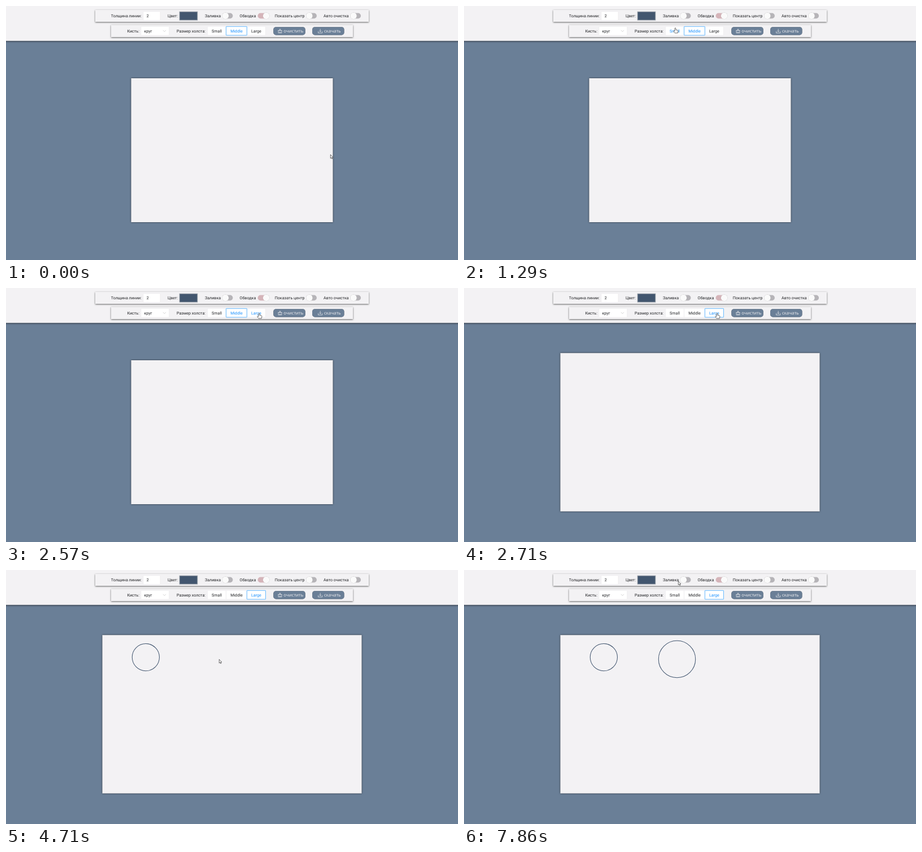
Write an HTML page that moves like this. It is 800x450 px and loops after 8000 ms.

```html
<!DOCTYPE html>
<html lang="ru">
<meta charset="utf-8">
<title>Paint</title>
<style>
  html, body { margin: 0; width: 100%; height: 100%; overflow: hidden; background: #6a7f97; }
  svg { display: block; width: 800px; height: 450px; }
  text { font: 7.14px Roboto, sans-serif; fill: #222326; text-rendering: geometricPrecision; }
  .btn text { font: 7.9px "Open Sans", "Noto Sans", sans-serif; fill: #f3f2f4; }
  .panel { fill: #f3f2f4; filter: drop-shadow(0 1px 1.4px #0009); }
  #sheet { filter: drop-shadow(.7px .8px 1.6px #000a); }
  .field { fill: #fff; stroke: #e4e3e7; stroke-width: .5; }
  .active rect { stroke: #40a9ff; stroke-width: .8; }
  .active text, .hover text { fill: #1890ff; }
  .line { fill: none; stroke: #f3f2f4; stroke-width: .7; }
  .ring { fill: none; stroke: #42566f; stroke-width: 1.02; }
  .btn rect { fill: #6a7f97; filter: drop-shadow(0 .4px .7px #0009); }
  .knob { fill: #fafafa; filter: drop-shadow(0 .6px .7px #0006); }
  .cursor { fill: #fff; stroke: #333; stroke-width: .7; }
</style>
<svg viewBox="0 0 800 450">
  <rect class="panel" x="-9" y="-9" width="818" height="70.8"/>
  <rect class="panel" x="158" y="7" width="484" height="21"/>
  <rect class="panel" x="186" y="33.5" width="428" height="21.5"/>

  <text x="185.8" y="19.7">Толщина линии:</text>
  <rect class="field" x="242.8" y="9.8" width="30.2" height="15.8" rx="1"/>
  <text x="248.7" y="20.2">2</text>
  <text x="286" y="19.7">Цвет:</text>
  <rect x="307.2" y="10.2" width="31.6" height="14.8" fill="#42566f" stroke="#8e969f"/>
  <g id="switches"></g>

  <text x="214.5" y="46.5">Кисть:</text>
  <rect class="field" x="238.8" y="36.2" width="50" height="15.8" rx="1"/>
  <text x="244.4" y="46.7">круг</text>
  <path d="M278 42.8l2.5 2.8 2.5-2.8" fill="none" stroke="#bbb" stroke-width=".6"/>
  <text x="302" y="46.5">Размер холста:</text>
  <g id="sizes"></g>

  <g class="btn">
    <rect x="473.3" y="37.2" width="56.4" height="14.2" rx="4.5"/>
    <path class="line" d="M481.3 43.5h7.4M482 43.5v4.2h6v-4.2M484 43.5v-2.3h2v2.3M484 47.5v-1.8M486 47.5v-1.8"/>
    <text x="491.2" y="47.3">очистить</text>
    <rect x="542.1" y="37.2" width="56.4" height="14.2" rx="4.5"/>
    <path class="line" d="M552.6 44.8v3h7.2v-3M556.2 40.6v5M554.4 43.8l1.8 1.9 1.8-1.9"/>
    <text x="563" y="47.3">скачать</text>
  </g>

  <rect class="panel" id="sheet"/>
  <g id="rings"></g>
  <path class="cursor" id="arrow" d="M.3 .3V7L1.8 5.6 2.9 7.8 3.8 7.4 2.9 5.2H4.8Z"/>
  <path class="cursor" id="hand" d="M-1 6V1Q0-.8 1 1V3.8L4.2 4.5Q5 4.8 4.9 6L4.2 9.4H-.8L-3.4 6.4Q-3.2 5-1 6Z"/>
</svg>
<script>
const $ = s => document.querySelector(s);

function add(parent, tag, attrs, text = '') {
  const el = document.createElementNS('http://www.w3.org/2000/svg', tag);
  for (const k in attrs) el.setAttribute(k, attrs[k]);
  el.textContent = text;
  return parent.appendChild(el);
}

// switches flow from left to right after their labels
let x = 352;
for (const label of ['Заливка', 'Обводка', 'Показать центр', 'Авто очистка']) {
  const on = label === 'Обводка';
  const text = add($('#switches'), 'text', { x, y: 19.7 }, label);
  x += text.getComputedTextLength() + 8.3;
  add($('#switches'), 'rect', {
    x: x - 5, y: 12.6, width: 18, height: 9.6, rx: 4.8, fill: on ? '#d5b4b9' : '#b6b4b8'
  });
  add($('#switches'), 'circle', { class: 'knob', cx: x + on * 10, cy: 17.4, r: 5.8 });
  x += 25.1;
}

// sheet sizes in page pixels; buttons are as wide as their labels
const scale = .51, pad = 7.65;
x = 356.4;
const sizes = [['Small', 600, 400], ['Middle', 700, 500], ['Large', 900, 550]].map(([label, w, h]) => {
  const el = add($('#sizes'), 'g');
  const box = add(el, 'rect', { class: 'field', x, y: 36.3, height: 15.6, rx: .5 });
  const text = add(el, 'text', { x: x + pad, y: 46.7 }, label);
  const left = x, width = text.getComputedTextLength() + 2 * pad;
  box.setAttribute('width', width);
  x += width;
  return { el, left, right: x, w: w * scale, h: h * scale };
});

// circles grow while the pointer drags from step `from` to step `to`
const rings = [
  { cx: 247.4, cy: 154.6, r: 24.1, from: 26, to: 29 },
  { cx: 377, cy: 158, r: 32.7, from: 33, to: 38 }
];
for (const ring of rings) ring.el = add($('#rings'), 'circle', { class: 'ring', cx: ring.cx, cy: ring.cy });

// pointer moves: first step, last step, goal
const moves = [
  [0, 8, 374, 38.5], [10, 14, 411, 47], [15, 18, 448, 44.5], [20, 25, 235, 151],
  [25, 26, 247.4, 154.6], [26, 29, 250, 178.5], [29, 33, 377, 158], [33, 38, 404, 177],
  [40, 41, 357, 158], [42, 44, 384, 141], [47, 55, 379, 19.5]
];
const clicks = [10, 15, 19];

const ramp = (t, a, b) => Math.min(1, Math.max(0, (t - a) / (b - a)));
const ease = k => k * k * (3 - 2 * k);

function pointer(step) {
  let px = 574, py = 263;
  for (const [from, to, goalX, goalY] of moves) {
    const k = ease(ramp(step, from, to));
    px += (goalX - px) * k;
    py += (goalY - py) * k;
  }
  return [px, py];
}

function draw(now) {
  // the picture advances seven times a second
  const step = Math.min(55, Math.floor((now % 8000 + 4) * 7 / 1000));
  const [px, py] = pointer(step);
  const clicked = clicks.filter(c => c <= step).length;
  const active = sizes[[1, 0, 1, 2][clicked]];
  let over = false;

  for (const size of sizes) {
    const hover = px > size.left && px < size.right && py > 36 && py < 52;
    over ||= hover;
    size.el.classList.toggle('hover', hover);
    size.el.classList.toggle('active', size === active);
  }
  $('#sizes').append(active.el);

  const { w, h } = active, sheet = $('#sheet');
  sheet.setAttribute('x', 400 - w / 2);
  sheet.setAttribute('y', 255.5 - h / 2);
  sheet.setAttribute('width', w);
  sheet.setAttribute('height', h);
  for (const { el, r, from, to } of rings) el.setAttribute('r', r * ease(ramp(step, from, to)));

  for (const [id, shown] of [['#arrow', !over], ['#hand', over]]) {
    $(id).setAttribute('transform', `translate(${px} ${py})`);
    $(id).style.display = shown ? '' : 'none';
  }
}

const start = performance.now();
function loop() {
  draw(performance.now() - start);
  requestAnimationFrame(loop);
}
loop();
</script>
</html>
```
